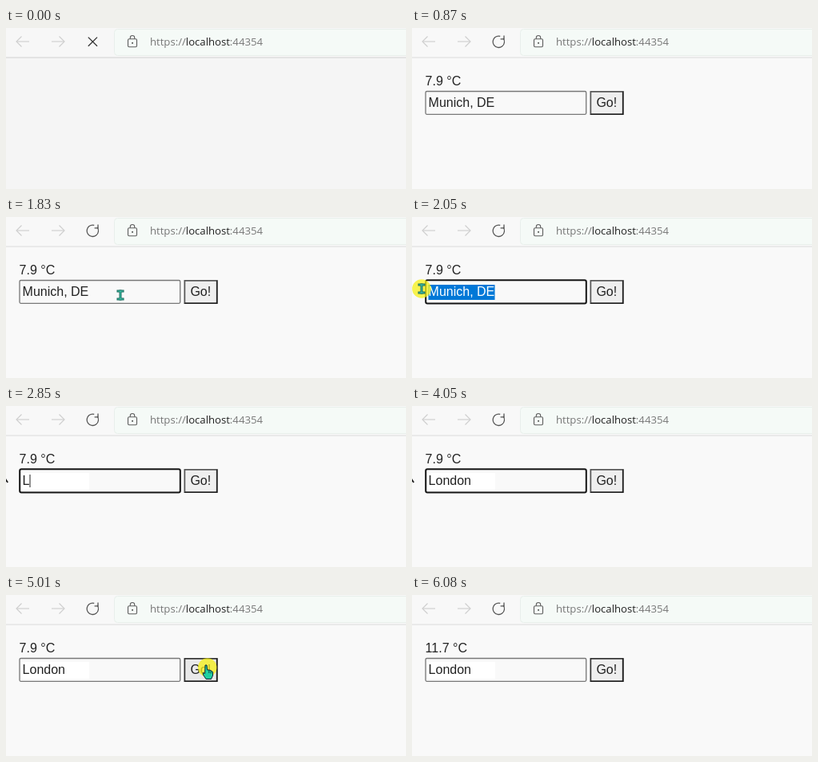
An HTML page with a canvas for the animation above (6.68 s loop, 500 px wide and 202 px high).

```html
<!DOCTYPE html>
<html lang="en">
<head>
<meta charset="utf-8">
<title>Temperature lookup</title>
<style>
html, body { margin: 0; width: 100%; height: 100%; overflow: hidden; background: #f9f9f9; }
canvas { display: block; width: 500px; height: 202px; }
</style>
</head>
<body>
<canvas id="stage" width="500" height="202"></canvas>
<script>
const ctx = document.getElementById('stage').getContext('2d');
const LOOP = 6680;
const STEP = 70;
const UI = '16px "Liberation Sans", Arial, sans-serif';
const URL_FONT = '13.15px "Open Sans", "Noto Sans", sans-serif';
const TEAL = '#20d0a0';
const CITY = 'London';
const KEY_TIMES = [2850, 3050, 3250, 3320, 3390, 3520];

// Pointer stops after typing, one per step from 4180 ms
const TO_BUTTON = [[2, 92], [41, 116], [100, 127], [155, 130], [203, 129],
  [250, 112], [276, 94], [261, 90], [257, 89], [250, 88]];

const within = (t, a, b) => t >= a && t < b;

function rect(x, y, w, h, color) {
  ctx.fillStyle = color;
  ctx.fillRect(x, y, w, h);
}

function text(str, x, y, color = '#222', font = UI) {
  ctx.font = font;
  ctx.fillStyle = color;
  ctx.fillText(str, x, y);
  return x + ctx.measureText(str).width;
}

function line(points, color, width = 1.1) {
  ctx.beginPath();
  points.forEach(([x, y]) => ctx.lineTo(x, y));
  ctx.strokeStyle = color;
  ctx.lineWidth = width;
  ctx.stroke();
}

function roundBox(x, y, w, h, r, fill, stroke, width) {
  ctx.beginPath();
  ctx.roundRect(x, y, w, h, r);
  if (fill) {
    ctx.fillStyle = fill;
    ctx.fill();
  }
  ctx.strokeStyle = stroke;
  ctx.lineWidth = width;
  ctx.stroke();
}

function navArrow(x, dir) {
  const tip = x + 8 * dir;
  line([[x - 8 * dir, 17], [tip, 17]], '#cecece');
  line([[tip - 6.5 * dir, 10.5], [tip, 17], [tip - 6.5 * dir, 23.5]], '#cecece');
}

function reloadIcon() {
  ctx.beginPath();
  ctx.arc(108.3, 17.3, 7.2, -0.65, 5.2 - 0.1 * Math.PI + 0.1, false);
  ctx.strokeStyle = '#555';
  ctx.lineWidth = 1.3;
  ctx.stroke();
  line([[115, 9.5], [115, 13.8], [110.6, 13.8]], '#555', 1.3);
}

function lockIcon() {
  roundBox(152.5, 13.8, 11, 10, 1.5, null, '#5c5c5c', 1.1);
  ctx.beginPath();
  ctx.moveTo(155.3, 13.8);
  ctx.lineTo(155.3, 12.2);
  ctx.arc(158, 12.2, 2.7, Math.PI, 0);
  ctx.lineTo(160.7, 13.8);
  ctx.stroke();
  rect(157.2, 18, 1.7, 1.7, '#444');
}

function toolbar(loading) {
  rect(0, 0, 500, 37, loading ? '#f7f7f7' : '#f8f8f8');
  rect(0, 36.5, 500, 1.2, loading ? '#d8d8d8' : '#e2e2e2');
  roundBox(135.5, 1.5, 380, 33, 4, '#f5faf7', '#e8efeb', 1);
  navArrow(21, -1);
  navArrow(65, 1);
  if (loading) {
    line([[102.8, 11.6], [114, 22.8]], '#333', 1.3);
    line([[114, 11.6], [102.8, 22.8]], '#333', 1.3);
  } else {
    reloadIcon();
  }
  lockIcon();
  let x = text('https://', 180, 22, '#777', URL_FONT);
  x = text('localhost', x, 22, '#222', URL_FONT);
  text(':44354', x, 22, '#777', URL_FONT);
}

function field(t) {
  const focused = within(t, 1900, 5010);
  const typed = KEY_TIMES.filter(k => t >= k).length;
  if (typed) rect(20, 84, 84, 21, '#fff');
  if (focused) roundBox(17.2, 79.2, 200.6, 29.2, 2, null, '#141414', 2);
  else roundBox(17, 79.5, 200.7, 28.8, 1.5, null, '#777', 1.3);

  if (typed) {
    const end = text(CITY.slice(0, typed), 20.6, 99);
    const caretOn = t < 4050 || within(t, 4530, 5010);
    if (caretOn) rect(end, 86, 1, 16, '#222');
    return;
  }
  text('Munich, DE', 20.6, 99);
  if (focused) {
    // Dragging left selects from the end of the text
    const from = t < 1970 ? 103.5 : t < 2040 ? 80 : 20.5;
    ctx.save();
    ctx.beginPath();
    ctx.rect(from, 85, 103.5 - from, 19);
    ctx.clip();
    rect(20, 85, 84, 19, '#0078d7');
    text('Munich, DE', 20.6, 99, '#fff');
    ctx.restore();
  }
}

function button(t) {
  const hover = within(t, 4670, 6010);
  const light = t >= 5010 ? '#333' : '#555';
  rect(222.5, 79, 42, 30, light);
  ctx.beginPath();
  [[264.5, 79], [264.5, 109], [222.5, 109], [224.2, 107.3], [262.8, 107.3], [262.8, 80.7]]
    .forEach(([x, y]) => ctx.lineTo(x, y));
  ctx.fillStyle = '#1c1c1c';
  ctx.fill();
  rect(224.2, 80.7, 38.6, 26.6, hover ? '#e9e9e9' : '#efefef');
  text('Go!', 230.4, 99);
}

function glow(x, y) {
  ctx.beginPath();
  ctx.arc(x, y, 11.8, 0, 7);
  ctx.fillStyle = 'rgba(246,240,20,.75)';
  ctx.fill();
}

function shape(x, y, points) {
  ctx.beginPath();
  points.forEach(([dx, dy]) => ctx.lineTo(x + dx, y + dy));
  ctx.closePath();
  ctx.fillStyle = TEAL;
  ctx.fill();
  ctx.strokeStyle = '#123';
  ctx.lineWidth = 1;
  ctx.stroke();
}

function arrow(x, y) {
  shape(x, y, [[0, 0], [0, 14], [3.2, 11], [5.4, 16], [7.6, 15], [5.5, 10.2], [10, 10]]);
}

function beam(x, y) {
  const bars = [[-4.5, -6.5, 9, 3], [-1.5, -6.5, 3, 13], [-4.5, 3.5, 9, 3]];
  bars.forEach(([dx, dy, w, h]) => rect(x + dx, y + dy, w, h, '#17685a'));
  bars.forEach(([dx, dy, w, h]) => rect(x + dx + 1, y + dy + 1, w - 2, h - 2, '#45cdb4'));
}

function hand(x, y) {
  shape(x, y, [[-1, 0], [1, 0], [1.6, 6], [4, 6], [6.5, 7], [8.5, 8.5], [8.5, 13],
    [6.5, 17.5], [0, 17.5], [-3.6, 12], [-3.6, 9.4], [-1.4, 10.5]]);
  line([[3.8, 6.5], [3.8, 10]].map(([a, b]) => [x + a, y + b]), '#123', 0.8);
  line([[6.2, 7.5], [6.2, 10.5]].map(([a, b]) => [x + a, y + b]), '#123', 0.8);
}

function pointer(t) {
  if (within(t, 1200, 1900)) {
    const p = Math.floor((t - 1200) / STEP) / 9;
    const left = (1 - p) ** 1.6;
    const x = 143 + 102 * left, y = 98 + 48 * left;
    if (y < 108 && x < 218) beam(x, y);
    else arrow(x, y);
  } else if (within(t, 1900, 2170)) {
    const x = t < 1970 ? 142 : t < 2040 ? 80 : 12;
    const y = t < 2040 ? 98 : 90;
    glow(x, y);
    beam(x, y);
  } else if (within(t, 2170, 4180)) {
    line([[-1, 91], [2.2, 96]], '#222', 1.8);
  } else if (within(t, 4180, 6010)) {
    const i = Math.min(9, Math.floor((t - 4180) / STEP));
    const [x, y] = TO_BUTTON[i];
    if (within(t, 5010, 5080)) glow(251.7, 91);
    if (i > 6) hand(x, y);
    else arrow(x, y);
  } else if (within(t, 6010, 6080)) {
    arrow(300, 123);
  }
}

function draw(t) {
  const loading = t < 70;
  rect(0, 0, 500, 202, loading ? '#f5f5f5' : '#f9f9f9');
  toolbar(loading);
  if (t >= 470) {
    const label = t < 870 ? 'Loading...' : t < 5210 ? '7.9 °C' : '11.7 °C';
    text(label, 16.6, 72);
  }
  if (t >= 870) {
    field(t);
    button(t);
    pointer(t);
  }
}

const start = performance.now();
function tick() {
  draw((performance.now() - start) % LOOP);
  requestAnimationFrame(tick);
}
tick();
</script>
</body>
</html>
```
